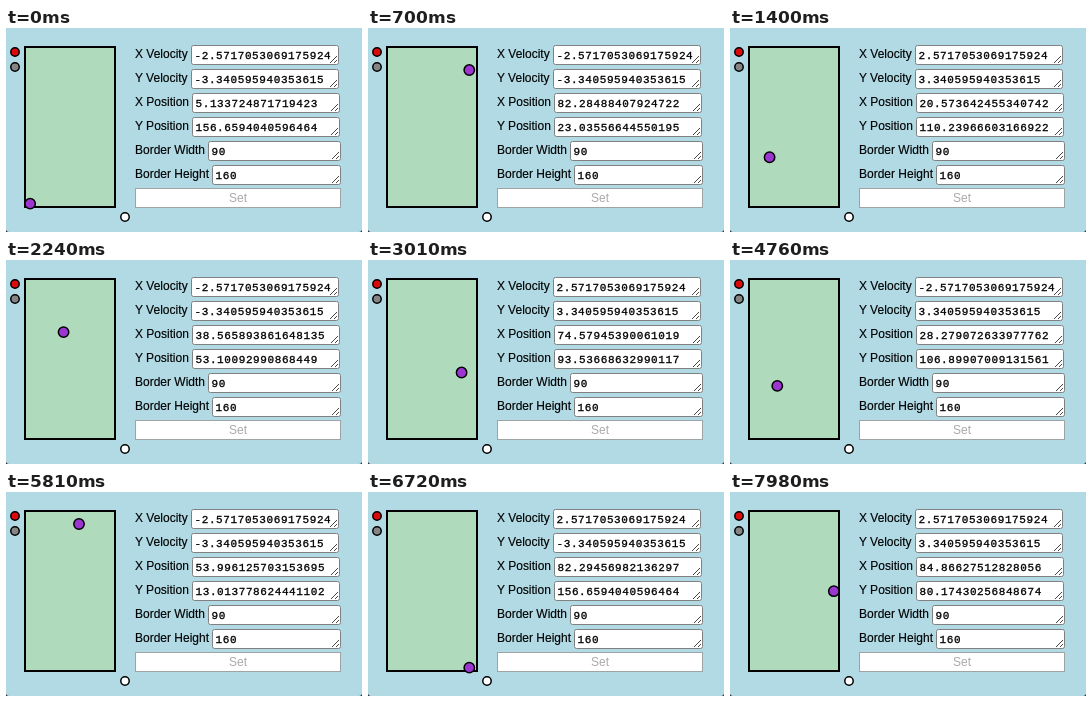
Write an HTML page that moves like this. It is 356 px wide and 204 px high and loops after 8000 ms.

```html
<!DOCTYPE html>
<html lang="en">
<head>
<meta charset="utf-8">
<title>Bouncing ball</title>
<style>
  html, body { margin: 0; width: 100%; height: 100%; overflow: hidden; background: #222; }
  svg { display: block; width: 100%; height: 100%; background: #b1dae5; border-radius: 0 0 3px 3px; }
  text { font: 12px "Liberation Sans", Arial, sans-serif; }
  .label { stroke: #000; stroke-width: .15; }
  .value { font: 11px "Liberation Mono", "Courier New", monospace; letter-spacing: .6px; stroke: #000; stroke-width: .3; }
  .field { fill: #fff; stroke: #808080; }
  .grip { stroke: #444; }
  .button { fill: #fff; stroke: #9ea3a5; }
  .dot { stroke: #000; stroke-width: 1.5; }
</style>
</head>
<body>
<svg id="stage" viewBox="0 0 356 204">
  <rect x="19" y="19" width="90" height="160" fill="#b0dabc" stroke="#000" stroke-width="2"/>
  <circle class="dot" cx="9" cy="24" r="4.2" fill="#dc0909"/>
  <circle class="dot" cx="9" cy="39" r="4.2" fill="#858585"/>
  <circle class="dot" cx="119" cy="189" r="4.2" fill="#fff"/>
  <circle class="dot" id="ball" r="5.2" fill="#9b36d0"/>
  <g id="form"></g>
  <rect class="button" x="129.5" y="160.5" width="205" height="19"/>
  <text x="232" y="174" text-anchor="middle" fill="#aaa">Set</text>
</svg>
<script>
const WIDTH = 90, HEIGHT = 160, LOOP = 8000, FRAME = 70;
const form = document.getElementById("form");
const ball = document.getElementById("ball");

function addField(label, left, right, row) {
  const top = 17 + row * 24;
  form.insertAdjacentHTML("beforeend", `
    <text class="label" x="129" y="${top + 13}">${label}</text>
    <rect class="field" x="${left + .5}" y="${top + .5}" width="${right - left - 1}" height="19" rx="2"/>
    <path class="grip" d="M${right - 9} ${top + 18}l7-7m-3 7l3-3"/>
    <text class="value" x="${left + 3.5}" y="${top + 14}"></text>`);
  return form.lastElementChild;
}

const fields = [
  ["X Velocity", 185, 333], ["Y Velocity", 185, 333],
  ["X Position", 186, 334], ["Y Position", 186, 334],
  ["Border Width", 202, 335], ["Border Height", 206, 335]
].map(([label, left, right], row) => addField(label, left, right, row));

// Move one axis; a wall stops the ball exactly on it and reverses it.
function advance({ pos, vel }, limit) {
  const next = pos + vel;
  if (next < 0 || next > limit) return { pos: next < 0 ? 0 : limit, vel: -vel };
  return { pos: next, vel };
}

const states = [{
  x: { pos: 5.133724871719423, vel: -2.5717053069175924 },
  y: { pos: 156.6594040596464, vel: -3.340595940353615 }
}];
while (states.length < 460) {
  const { x, y } = states[states.length - 1];
  states.push({ x: advance(x, WIDTH), y: advance(y, HEIGHT) });
}

function draw(now) {
  const frame = Math.floor((now % LOOP) / FRAME);
  // Four ticks per frame, with a slight recurring lag.
  const { x, y } = states[4 * frame - (frame % 5 > 1 ? 1 : 0)];
  ball.setAttribute("cx", 19 + x.pos);
  ball.setAttribute("cy", 19 + y.pos);
  [x.vel, y.vel, x.pos, y.pos, WIDTH, HEIGHT].forEach((value, i) => {
    fields[i].textContent = value;
  });
}

function tick() {
  draw(performance.now());
  requestAnimationFrame(tick);
}
tick();
</script>
</body>
</html>
```
